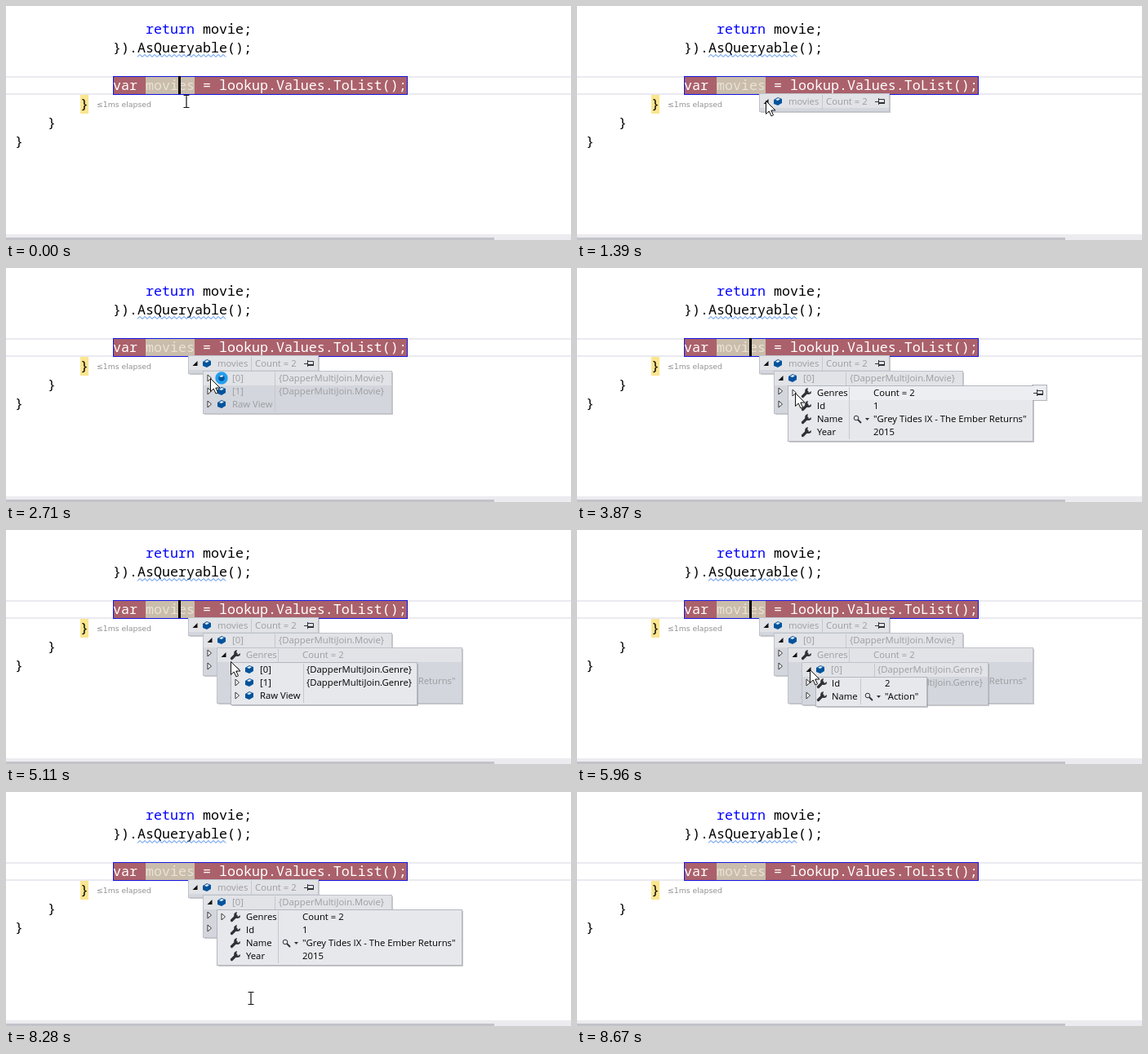
An HTML page that plays this animation: 692x287 px, repeating every 9290 ms.

```html
<!DOCTYPE html>
<html lang="en">
<head>
<meta charset="utf-8">
<title>Debugger data tip</title>
<style>
  html, body { margin: 0; width: 100%; height: 100%; overflow: hidden; background: #fff; }
  svg { display: block; }
  text { white-space: pre; }
  .code { font: 16.667px "Noto Sans Mono", monospace; }
  .tip { font: 11.3px "Open Sans", sans-serif; fill: #000; }
  .dim .tip { fill: #9c9da1; }
  .back { fill: #e7e8ec; stroke: #b4b6bf; }
  .dim .back { fill: #d3d6dc; stroke: #bfc2ca; }
  .head { visibility: hidden; fill: #e2e3e7; }
  .dim .head { visibility: inherit; }
  .rule { stroke: #c6c8ce; }
  .ink { fill: none; stroke: #2f3036; }
</style>
</head>
<body>
<svg id="stage" width="692" height="287" viewBox="0 0 692 287"></svg>
<script>
const LOOP = 9290;
const stage = document.getElementById('stage');

// Panels from the outermost inwards; times are [from, to) in ms.
const panels = [
  { x: 223, y: 107, w: 159, h: 22, mid: 10, rule: 300, value: 305, icon: 'cube', pin: 371,
    shown: [380, 8670], dim: [1300, LOOP], rows: [['movies', 'Count = 2']] },
  { x: 241, y: 126, w: 231, h: 52, mid: 9, rule: 329, value: 334, icon: 'cube',
    shown: [1470, 8670], dim: [2710, LOOP], open: [2780, LOOP], hover: [[2400, 2710]],
    rows: [['[0]', '{DapperMultiJoin.Movie}'], ['[1]', '{DapperMultiJoin.Movie}'], ['Raw View']] },
  { x: 258, y: 144, w: 300, h: 68, mid: 9, rule: 333, value: 363, icon: 'wrench', leaves: true,
    shown: [2860, 8670], dim: [4240, 7580], hover: [[3550, 4240], [7580, 8130]],
    rows: [['Genres', 'Count = 2'], ['Id', '1'],
           ['Name', '"Grey Tides IX - The Ember Returns"', true], ['Year', '2015']] },
  { x: 275, y: 162, w: 228, h: 52, mid: 9, rule: 364, value: 368, icon: 'cube',
    shown: [4240, 7580], dim: [5640, 6890], hover: [[5260, 5640], [6890, 7280]],
    rows: [['[0]', '{DapperMultiJoin.Genre}'], ['[1]', '{DapperMultiJoin.Genre}'], ['Raw View']] },
  { x: 292, y: 180, w: 136, h: 36, mid: 8, rule: 347, value: 377, icon: 'wrench', flat: true,
    shown: [5730, 6890], dim: [LOOP, LOOP], rows: [['Id', '2'], ['Name', '"Action"', true]] }
];

// Pointer moves: start, last step, step count, destination.
const moves = [
  [70, 380, 5, 222, 103], [920, 1150, 4, 231, 116], [1770, 2080, 5, 239, 127],
  [2230, 2480, 4, 250, 135], [3240, 3870, 9, 267, 153], [4880, 5490, 9, 285, 171],
  [7130, 7580, 7, 272, 157], [8050, 8280, 4, 300, 253]
];
const caretToggles = [150, 690, 1300, 1770, 2300, 2780, 3320, 3870, 4420, 4960, 5490, 5960, 6500];

const at = (x, y, content) => `<g transform="translate(${x} ${y})">${content}</g>`;
const rect = (x, y, w, h, attrs) => `<rect x="${x}" y="${y}" width="${w}" height="${h}" ${attrs}/>`;
const label = (x, y, cls, content, fill = '') =>
  `<text x="${x}" y="${y}" class="${cls}" ${fill && `fill="${fill}"`}>${content}</text>`;

const icons = {
  cube: '<path d="M-5-2 0-5 5-3 5 2 0 5-5 3z" fill="#00539c"/><path d="M-3-2 0-4 3-3 0-1z" fill="#e4eef8"/>',
  wrench: '<path d="M-4.5 4.5 1-1" fill="none" stroke="#2f3036" stroke-width="3.2" stroke-linecap="round"/>' +
          '<path d="M2-6Q-3-5-1.5 0 1 3.5 5.5 1L6-2 3 0 1-2z" fill="#2f3036"/>'
};
const pinIcon = '<path class="ink" d="M-6 .5h4M-1.5-4v8M-1-2.5h6.5v5"/>' +
                '<path class="ink" stroke-width="2" d="M-1 2h7"/>';
const lens = '<circle class="ink" cx="-1" cy="-1" r="2.8"/><path class="ink" stroke-width="1.8" d="m1 1 4 4"/>' +
             '<path d="M10-1h5l-2.5 3z" fill="#2f3036"/>';

function expander(x, y, first) {
  const closed = '<path class="closed" d="M-2.5-4 2 0-2.5 4z" fill="#fff" stroke="#333"/>';
  const opened = '<path class="opened" d="M3-3v6h-6z" fill="#111"/>';
  return at(x, y, closed + (first ? opened : ''));
}

function panelMarkup(p) {
  const right = p.x + p.w, iconX = p.x + (p.flat ? 8 : 23);
  let out = '';
  if (p.hover) out += rect(right - .5, p.y - .5, 18, 19, 'class="hover back"');
  out += rect(p.x + 2, p.y + 2, p.w, p.h, 'fill="#777" opacity=".4"') +
    rect(p.x + .5, p.y + .5, p.w, p.h, 'class="back"') +
    rect(p.x + 1, p.y + 1, p.w - 1, 17, 'class="head"');
  if (p.hover) {
    out += rect(p.x + 1, p.y + 1, p.w + 14, 17, 'class="hover" fill="#edeef2"') +
      `<g class="hover">${at(right + 7, p.y + p.mid, pinIcon)}</g>`;
  }
  out += `<path class="rule" d="M${p.rule + .5} ${p.y + 2}V${p.y + p.h - 2}"/>`;
  p.rows.forEach(([name, value, searchable], i) => {
    const y = p.y + p.mid + i * 16;
    if (!p.flat && !(p.leaves && i)) out += expander(p.x + 8.5, y, !i);
    out += at(iconX, y, icons[p.icon]) + label(p.x + (p.flat ? 20 : 36), y + 4, 'tip', name);
    if (value) out += label(p.value, y + 4, 'tip', value);
    if (searchable) out += at(p.value - 20, y, lens);
  });
  if (p.pin) out += at(p.pin, p.y + p.mid, pinIcon);
  return `<g class="panel">${out}</g>`;
}

const editor =
  rect(0, 86, 692, 2, 'fill="#eaeaf0"') + rect(0, 107, 692, 2, 'fill="#eaeaf0"') +
  rect(131.5, 86.5, 360, 22, 'fill="#ab616b" stroke="#1414e0"') +
  rect(171, 87, 60, 21, 'fill="#cabdab"') + rect(91, 109, 10, 23, 'fill="#fbe58e"') +
  label(171, 34, 'code', '<tspan fill="#00f">return</tspan> movie;') +
  label(131, 57, 'code', '}).AsQueryable();') +
  `<path d="M161 62.5${'l3-3 3 3'.repeat(18)}" fill="none" stroke="#3c82e6"/>` +
  label(131, 103, 'code', 'var <tspan fill="#e9e2d6">movies</tspan> = lookup.Values.ToList();', '#fff') +
  label(91, 126, 'code', '}') + label(51, 149, 'code', '}') + label(11, 172, 'code', '}') +
  '<text x="111" y="124" fill="#929292" style="font:9.3px \'DejaVu Sans\',sans-serif">≤1ms elapsed</text>' +
  rect(0, 280, 692, 7, 'fill="#ececf0"') + rect(0, 284, 598, 3, 'fill="#c2c3c9"');

const pointer = '<g id="pointer">' +
  '<path id="beam" d="M-3.5-7.5h3l.5.5.5-.5h3M0-7V7M-3.5 7.5h3L0 7l.5.5h3" fill="none" stroke="#111" stroke-width="1.2"/>' +
  '<g id="arrow"><path d="M.5.5v16l3.7-3.5 2.8 6 2.5-1.2-2.7-5.8H12z" fill="#fff" stroke="#111"/></g>' +
  '<circle id="busy" cx="14" r="5.7" fill="none" stroke="#23a0ee" stroke-width="4"/></g>';

stage.innerHTML = editor + rect(211, 86, 3, 22, 'id="caret"') +
  panels.map(panelMarkup).join('') + pointer;

const byId = id => document.getElementById(id);
const show = (el, on) => el.setAttribute('visibility', on ? 'inherit' : 'hidden');
const within = (t, [from, to]) => t >= from && t < to;
const groups = [...stage.querySelectorAll('.panel')];

function pointerAt(t) {
  let x = 221, y = 117;
  for (const [start, last, count, toX, toY] of moves) {
    if (t < start) break;
    const step = Math.floor((t - start) / (last - start) * (count - 1) + 1e-6) + 1;
    const k = Math.min(1, step / count);
    x += (toX - x) * k;
    y += (toY - y) * k;
  }
  return [Math.round(x), Math.round(y)];
}

function draw(t) {
  show(byId('caret'), caretToggles.filter(time => time <= t).length % 2 === 0);

  const opacity = t < 8510 ? 1 : t < 8590 ? .66 : .33;
  panels.forEach((p, i) => {
    const g = groups[i], shown = within(t, p.shown);
    g.style.display = shown ? '' : 'none';
    if (!shown) return;
    g.setAttribute('opacity', opacity);
    g.classList.toggle('dim', within(t, p.dim));
    const opened = g.querySelector('.opened');
    if (opened) {
      const isOpen = within(t, p.open || p.dim);
      show(opened, isOpen);
      show(g.querySelector('.closed'), !isOpen);
    }
    const hovered = (p.hover || []).some(span => within(t, span));
    g.querySelectorAll('.hover').forEach(el => show(el, hovered));
  });

  const [x, y] = pointerAt(t);
  const isArrow = within(t, [990, 8200]);
  byId('pointer').setAttribute('transform', `translate(${x} ${y})`);
  show(byId('pointer'), t < 8670);
  show(byId('arrow'), isArrow);
  show(byId('beam'), !isArrow);
  show(byId('busy'), within(t, [2710, 2780]));
}

const begin = performance.now();
function tick() {
  draw((performance.now() - begin) % LOOP);
  requestAnimationFrame(tick);
}
tick();
</script>
</body>
</html>
```
